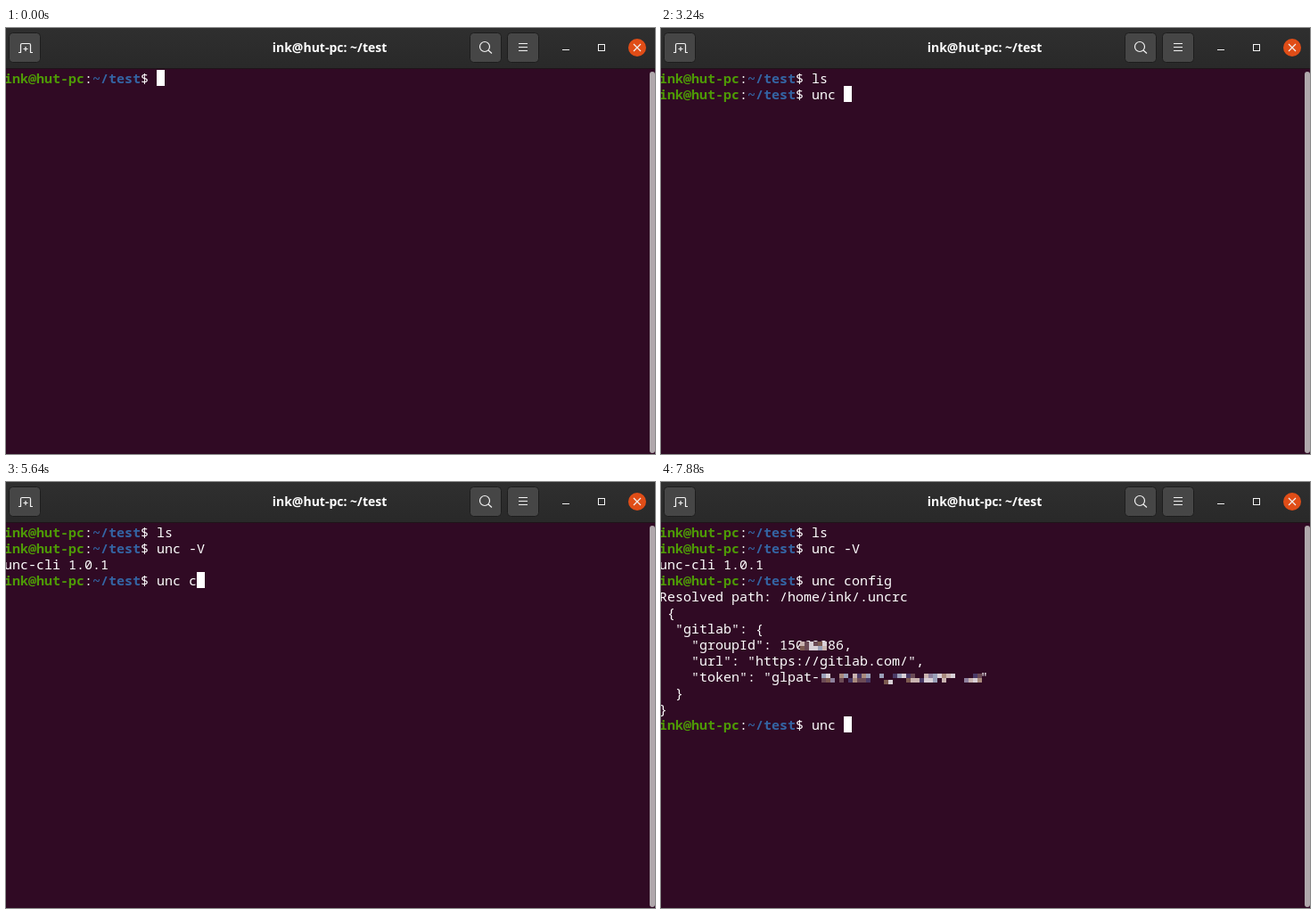
Animation, 728 px wide and 478 px high, one loop 8000 ms. Source, as an HTML page:

```html
<!DOCTYPE html>
<html lang="en">
<head>
<meta charset="utf-8">
<title>Terminal</title>
<style>
  html, body { margin: 0; width: 100%; height: 100%; overflow: hidden; background: #300a24; }
  svg { display: block; }
  text { white-space: pre; fill: #fff; }
  #lines { font: 15px "Noto Sans Mono", monospace; }
  .user { fill: #4e9a06; font-weight: bold; }
  .path { fill: #3465a4; font-weight: bold; }
  .title { font: bold 14px "Open Sans", sans-serif; text-anchor: middle; }
  .button { fill: #464646; stroke: #1d1d1d; }
  .icon { fill: none; stroke: #f2f2f2; stroke-width: 1.2; }
  .crisp { fill: none; stroke: #f2f2f2; shape-rendering: crispEdges; }
</style>
</head>
<body>
<svg width="728" height="478" viewBox="0 0 728 478">
  <defs>
    <linearGradient id="bar" x2="0" y2="1">
      <stop stop-color="#2f2f2f"/><stop offset="1" stop-color="#292929"/>
    </linearGradient>
  </defs>
  <rect width="728" height="478" fill="#300a24"/>
  <rect width="728" height="45" fill="url(#bar)"/>
  <rect y="45" width="728" height="1" fill="#1f1419"/>
  <g class="button">
    <rect x="3.5" y="5.5" width="35" height="33" rx="4"/>
    <rect x="520.5" y="5.5" width="35" height="33" rx="4"/>
    <rect x="562.5" y="5.5" width="35" height="33" rx="4"/>
  </g>
  <path class="icon" d="M14 27.5H16.5V19Q16.5 17.5 18 17.5H26Q27.5 17.5 27.5 19V27.5H30M19.5 23.5H24.5M22 21V26"/>
  <circle class="icon" cx="537" cy="21" r="5.5"/>
  <path class="icon" d="M541 25L545 28.5"/>
  <path class="crisp" d="M575 17.5H585M575 21.5H585M575 25.5H585M624 24.5H632M664.5 18.5H671.5V25.5H664.5Z"/>
  <circle cx="708" cy="22" r="10" fill="#e04d17"/>
  <path class="icon" d="M704 18L712 26M712 18L704 26"/>
  <text class="title" x="363" y="27">ink@hut-pc: ~/test</text>
  <rect x="722" y="49" width="6" height="428" rx="3" fill="#b0a8ac"/>

  <g id="lines"></g>
  <g id="mosaic"></g>
  <rect id="caret" width="9" height="18" fill="#fff"/>
  <g id="pointer" fill="none">
    <path id="beam" d="M1.5 1.5H3.5L4.5 2.5L5.5 1.5H7.5M4.5 2.5V14.5M1.5 15.5H3.5L4.5 14.5L5.5 15.5H7.5" stroke="#fff" stroke-width="3"/>
    <use href="#beam" style="stroke:#111"/>
    <path d="M1.5 1.5H3.5L4.5 2.5L5.5 1.5H7.5M4.5 2.5V14.5M1.5 15.5H3.5L4.5 14.5L5.5 15.5H7.5" stroke="#111"/>
  </g>
</svg>
<script>
const LOOP = 8000, COL = 9, ROW = 18, LEFT = -2, TOP = 47, PROMPT_COLS = 19;
const $ = id => document.getElementById(id);

const config = `Resolved path: /home/ink/.uncrc
 {
  "gitlab": {
    "groupId": 15069986,
    "url": "https://gitlab.com/",
    "token": "glpat-                    "
  }
}
>`;

// Text appended to the screen over time; a line starting with ">" has a prompt.
const feed = [
  [0, '>'], [1200, 'l'], [1320, 's'], [1440, '\n>'],
  [2440, 'u'], [2600, 'n'], [2920, 'c'], [3240, ' '], [3560, '-'], [3840, 'V'],
  [4040, '\n'], [4440, 'unc-cli 1.0.1\n>'],
  [5000, 'u'], [5120, 'n'], [5320, 'c'], [5520, ' '], [5640, 'c'], [5760, 'o'],
  [5840, 'n'], [6040, 'f'], [6160, 'i'], [6320, 'g'],
  [6440, '\n'], [6840, config],
  [7400, 'u'], [7480, 'n'], [7680, 'c'], [7880, ' ']
];
const caretOff = [[2040, 2440], [4640, 5000], [6960, 7360]];
const prompt = '<tspan class="user">ink@hut-pc</tspan>:<tspan class="path">~/test</tspan>$ ';

// Pixelated patches hiding the id and the token
let seed = 7;
const rand = () => (seed = seed * 16807 % 2147483647) / 2147483647;
const tones = ['#c9b3b0', '#8d7f9c', '#6b4a55', '#a98a7d', '#4a3a66', '#d8cfd6', '#7c5a50', '#9aa0b8'];
function patch(x, y, cols, rows, fill) {
  let out = '';
  for (let i = 0; i < cols * rows; i++) {
    const tone = tones[Math.floor(rand() * tones.length)];
    if (rand() < fill)
      out += `<rect x="${x + i % cols * 5}" y="${y + Math.floor(i / cols) * 5}" width="5" height="5" fill="${tone}"/>`;
  }
  return out;
}
$('mosaic').innerHTML =
  '<rect x="156" y="179" width="30" height="11" fill="#300a24"/>' + patch(156, 179, 6, 2, .95) +
  patch(180, 215, 3, 2, .8) + patch(200, 215, 7, 2, .8) + patch(245, 215, 1, 1, 1) +
  patch(250, 222, 2, 1, 1) + patch(260, 215, 12, 2, .8) + patch(320, 215, 2, 1, 1) +
  patch(340, 215, 4, 2, .8);

function pointerAt(t) {
  if (t >= 680) return [409, 105];
  const step = [360, 400, 480].filter(s => t >= s).length / 3;
  const rest = (1 - step) ** 1.4;
  return [392 + 232 * rest, 109 + 289 * rest];
}

let shown = '';
function draw(t) {
  const screen = feed.filter(e => e[0] <= t).map(e => e[1]).join('');
  const lines = screen.split('\n');
  if (screen !== shown) {
    $('lines').innerHTML = lines.map((s, i) =>
      `<text x="${LEFT}" y="${TOP + 15 + i * ROW}">${s.replace(/^>/, prompt)}</text>`).join('');
    shown = screen;
  }
  const last = lines[lines.length - 1];
  const col = last[0] === '>' ? PROMPT_COLS + last.length - 1 : 0;
  $('caret').setAttribute('x', LEFT + col * COL);
  $('caret').setAttribute('y', TOP + (lines.length - 1) * ROW);
  $('caret').style.display = caretOff.some(([a, b]) => t >= a && t < b) ? 'none' : '';
  $('mosaic').style.display = t >= 6840 ? '' : 'none';
  $('pointer').style.display = t >= 280 && t < 1200 ? '' : 'none';
  $('pointer').setAttribute('transform', `translate(${pointerAt(t).map(Math.round)})`);
}

const start = performance.now();
function frame() {
  draw((performance.now() - start) % LOOP);
  requestAnimationFrame(frame);
}
frame();
</script>
</body>
</html>
```
